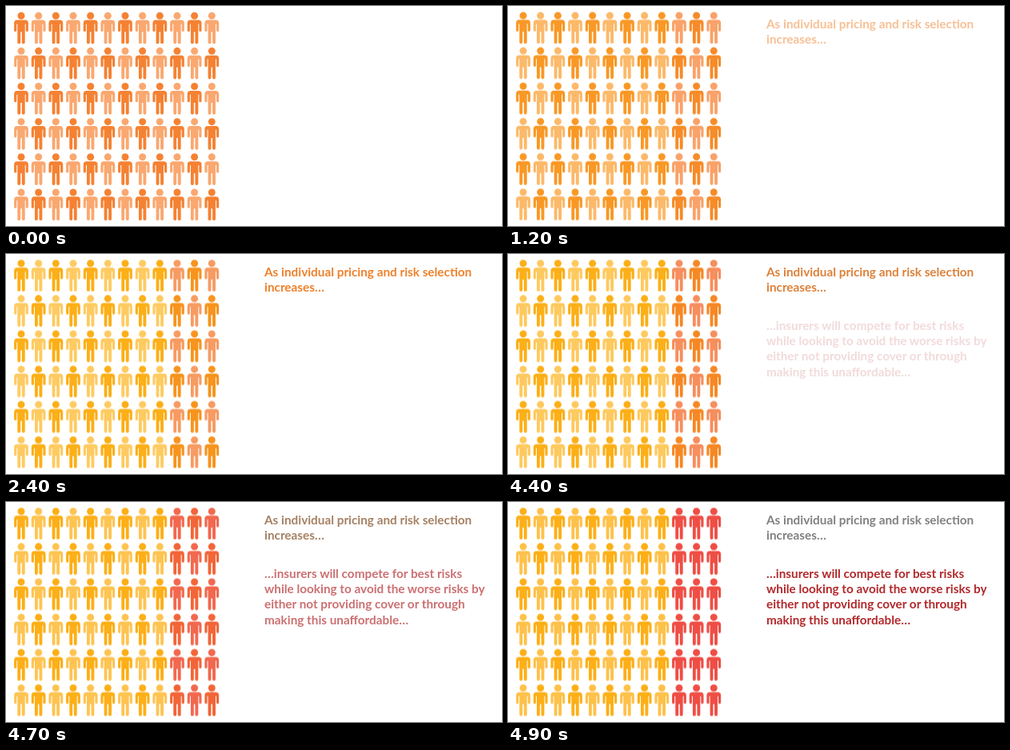
Recreate the animation shown at these times as an HTML page. Size 620 px wide and 275 px high, loop 8000 ms.

```html
<!DOCTYPE html>
<html lang="en">
<head>
<meta charset="utf-8">
<title>Risk selection</title>
<style>
  @property --a { syntax: '<percentage>'; inherits: true; initial-value: 0%; }
  @property --b { syntax: '<percentage>'; inherits: true; initial-value: 0%; }

  html, body { margin: 0; width: 100%; height: 100%; overflow: hidden; background: #fff; }
  svg {
    display: block; width: 620px; height: 275px;
    animation: split 8s infinite, select 8s infinite;
  }

  /* first change: five steps, a pause, then the last sixth */
  @keyframes split {
    0% { --a: 0%; animation-timing-function: step-end; }
    12.5% { --a: 0%; animation-timing-function: steps(5, jump-start); }
    18.75% { --a: 83.333%; animation-timing-function: step-end; }
    30%, 100% { --a: 100%; }
  }
  @keyframes select {
    0% { --b: 0%; animation-timing-function: step-end; }
    55% { --b: 0%; animation-timing-function: steps(6, jump-start); }
    62.5%, 100% { --b: 100%; }
  }

  .person {
    fill: color-mix(in srgb, color-mix(in srgb, var(--c0), var(--c1) var(--a)), var(--c2) var(--b));
  }
  .dark { --c0: #f58233; --c1: #fcaf17; --c2: #fdaf17; }
  .light { --c0: #faa870; --c1: #fecb62; --c2: #fec14a; }
  .risky.dark { --c1: #f7941d; --c2: #ef4e45; }
  .risky.light { --c1: #f79b62; --c2: #ef4e45; }

  #crowd { transform: translateY(calc(var(--shift) * -1)); --shift: 0px; animation: lift 8s infinite; }
  @keyframes lift {
    0% { --shift: 0px; transform: none; animation-timing-function: step-end; }
    12.5% { transform: none; animation-timing-function: steps(5, jump-start); }
    18.75%, 100% { transform: translateY(-.5px); }
  }

  text { font: 700 15.3px Lato, "Open Sans", sans-serif; }
  .cause { fill: color-mix(in srgb, #f08029, #808080 var(--b)); opacity: calc(var(--a) / 1%  / 100); opacity: var(--a); }
  .effect { fill: #b2282b; opacity: var(--b); }
</style>
</head>
<body>
<svg viewBox="0 0 620 275">
  <defs>
    <g id="man">
      <circle cy="4.6" r="4.5"/>
      <path d="M-5 10H5Q8.9 10 8.9 14V22.8a1.6 1.6 0 0 1-3.2 0V14.8H4.7V37.8a1.9 1.9 0 0 1-3.9 0V25H-.8V37.8a1.9 1.9 0 0 1-3.9 0V14.8H-5.7V22.8a1.6 1.6 0 0 1-3.2 0V14Q-8.9 10-5 10Z"/>
    </g>
  </defs>
  <g id="crowd"></g>
  <g class="cause">
    <text x="323" y="28">As individual pricing and risk selection</text>
    <text x="323" y="47.2">increases…</text>
  </g>
  <g class="effect">
    <text x="323" y="95">…insurers will compete for best risks</text>
    <text x="323" y="114.2">while looking to avoid the worse risks by</text>
    <text x="323" y="133.4">either not providing cover or through</text>
    <text x="323" y="152.6">making this unaffordable…</text>
  </g>
</svg>
<script>
  const crowd = document.getElementById('crowd');
  for (let row = 0; row < 6; row++) {
    for (let col = 0; col < 12; col++) {
      const man = document.createElementNS('http://www.w3.org/2000/svg', 'use');
      man.setAttribute('href', '#man');
      man.setAttribute('x', 19 + col * 21.66);
      man.setAttribute('y', 7.6 + row * 44.15);
      const shade = (row + col) % 2 ? 'light' : 'dark';
      man.setAttribute('class', `person ${shade}${col > 8 ? ' risky' : ''}`);
      crowd.append(man);
    }
  }
</script>
</body>
</html>
```
